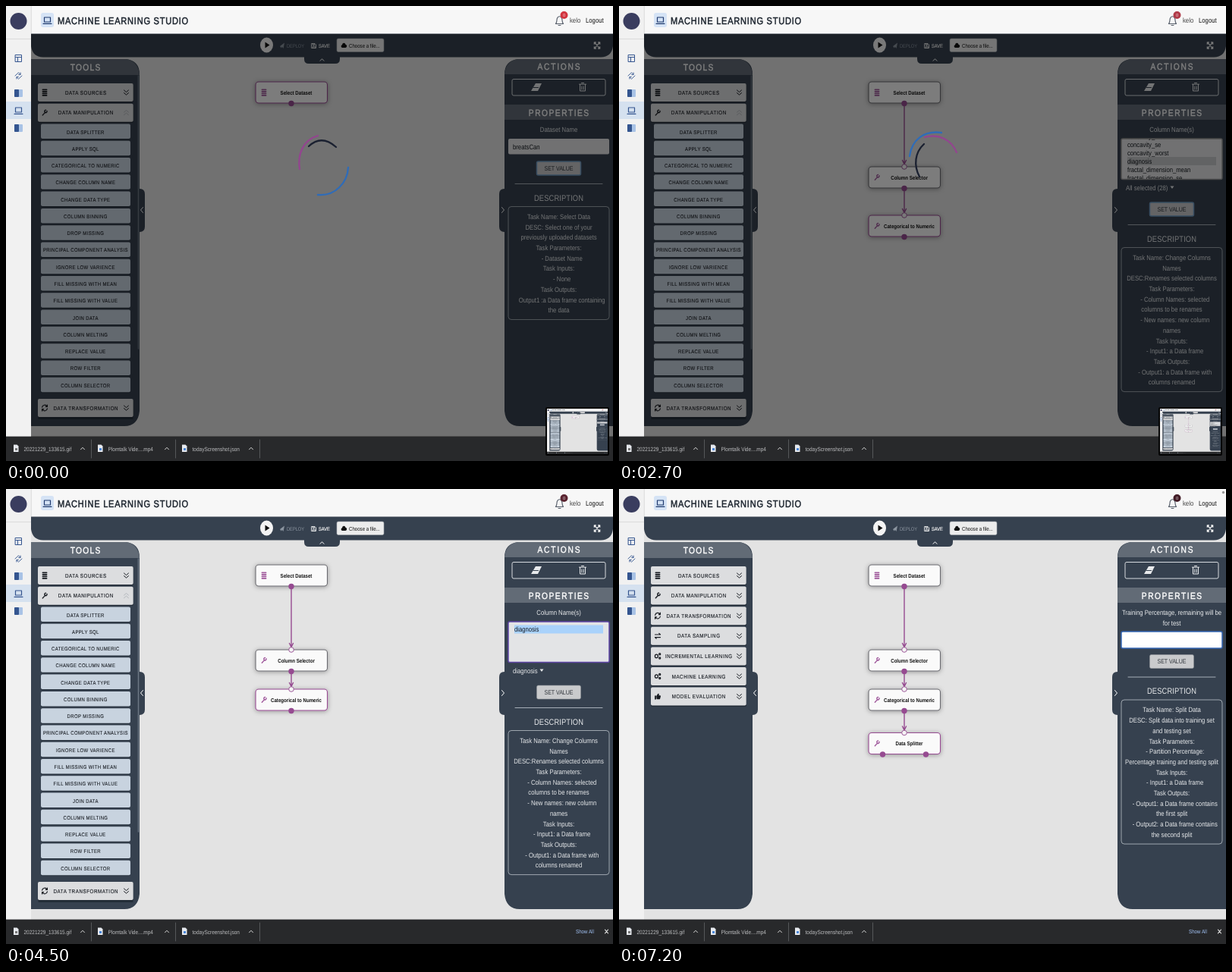
Animation, 800 px wide and 600 px high, one loop 8000 ms. Source, as an HTML page:

```html
<!DOCTYPE html>
<html lang="en">
<head>
<meta charset="utf-8">
<title>Machine Learning Studio</title>
<style>
  html, body { margin: 0; width: 100%; height: 100%; overflow: hidden; background: #e3e3e3; }
  svg { display: block; width: 800px; height: 600px; }
  text { font-family: "Liberation Sans", Arial, sans-serif; white-space: pre; text-rendering: geometricPrecision; }
</style>
</head>
<body>
<svg id="stage" viewBox="0 0 800 600"></svg>
<script>
const STEP = 900, LOOP = 8000;
const ASPECT = 0.85; // the whole screen is squeezed horizontally
const NAVY = '#36414f', STRIP = '#626b76', PURPLE = '#964b91', INK = '#161a20', PALE = '#e8eaec';

// ---- drawing helpers ----
const rect = (x, y, w, h, fill, r = 0, extra = '') =>
  `<rect x="${x}" y="${y}" width="${w}" height="${h}" rx="${r}" fill="${fill}" ${extra}/>`;
const outline = (color, width = 1) => `stroke="${color}" stroke-width="${width}"`;
const fillPath = (d, fill) => `<path d="${d}" fill="${fill}"/>`;
const line = (d, color, width = 1) =>
  `<path d="${d}" fill="none" stroke="${color}" stroke-width="${width}" stroke-linecap="round" stroke-linejoin="round"/>`;
const dot = (x, y, r, fill, extra = '') => `<circle cx="${x}" cy="${y}" r="${r}" fill="${fill}" ${extra}/>`;
const at = (x, y, content) => `<g transform="translate(${x} ${y})">${content}</g>`;

// y is the vertical middle of the capitals; centred text makes up for the gap after its last letter
function text(x, y, label, size, fill, { anchor = 'middle', gap = 0, weight = 400, heavy = 0 } = {}) {
  const left = anchor === 'middle' ? x + gap * ASPECT / 2 : x;
  return `<text transform="translate(${left} ${y + size * 0.36}) scale(${ASPECT} 1)" font-size="${size}" fill="${fill}"
    text-anchor="${anchor}" letter-spacing="${gap}" font-weight="${weight}" stroke="${fill}" stroke-width="${heavy}">${label}</text>`;
}
const left = (x, y, label, size, fill) => text(x, y, label, size, fill, { anchor: 'start' });

const ICONS = {
  db: ['M-2.6-3.7h5.2M-2.6-1.2h5.2M-2.6 1.3h5.2M-2.6 3.8h5.2', 1.7],
  wrench: ['M-2.7 3.2L.8-.6M3-2.2A1.6 1.8 0 1 1 1.5-3.6', 1.4],
  refresh: ['M-3.4-.8A3.5 3.8 0 0 1 3-2M3.4-4v2.4h-2M3.4.8A3.5 3.8 0 0 1-3 2M-3.4 4v-2.4h2', 1.2],
  swap: ['M-3.5-1.8h7l-1.7-1.6M3.5 1.8h-7l1.7 1.6', 1.2],
  gears: ['M-3.6 0a2 2.2 0 1 0 4 0a2 2.2 0 1 0-4 0M1.7-2.6a1 1.1 0 1 0 2 0a1 1.1 0 1 0-2 0M1.7 2.6a1 1.1 0 1 0 2 0a1 1.1 0 1 0-2 0', 1.3],
  thumb: ['M-3-.4v3.6M-.6 2.8h2.8l.9-3.2h-2.6l.3-2.6l-1.7 2.8zM.5 1.200h1.500', 1.8],
  laptop: ['M-4-4h8v6h-8zM-5.5 4.3h11', 1.2],
  layout: ['M-4-4.5h8v9h-8zM-4-1.5h8M-1-1.5v6', 1],
  sync: ['M-4.5 0L0-4.2L2.2-2M.2-1.4h2.4v-2.6M4.5 0L0 4.2L-2.2 2M-.2 1.4h-2.4v2.6', 0.9],
  bell: ['M-5 4.5c2-2 1-5 2-7.5c1-3 5-3 6 0c1 2.5 0 5.5 2 7.5zM-1.5 6.5h3', 1.1],
  trash: ['M-4.5-3.8h9M-1.5-5.5h3M-3.5-3.5v8.5h7v-8.5M-1.2-1v4M1.2-1v4', 1],
  expand: ['M-3.5-4L3.5 4M3.5-4L-3.5 4M-3.7-1.8v-2.4h2.2M3.7-1.8v-2.4h-2.2M-3.7 1.8v2.4h2.2M3.7 1.8v2.4h-2.2', 1.2],
  up: ['M-2.5 1.3l2.5-2.6l2.5 2.6', 1],
  twoDown: ['M-3-3l3 2.6l3-2.6M-3 .6l3 2.6l3-2.6', 1],
  twoUp: ['M-3 3l3-2.6l3 2.6M-3-.6l3-2.6l3 2.6', 1],
};
const icon = (name, x, y, color) => at(x, y, line(ICONS[name][0], color, ICONS[name][1]));

// ---- content ----
const CATEGORIES = [
  ['db', 'DATA SOURCES'], ['wrench', 'DATA MANIPULATION'], ['refresh', 'DATA TRANSFORMATION'],
  ['swap', 'DATA SAMPLING'], ['gears', 'INCREMENTAL LEARNING'], ['gears', 'MACHINE LEARNING'], ['thumb', 'MODEL EVALUATION'],
];
const TOOLS = ['DATA SPLITTER', 'APPLY SQL', 'CATEGORICAL TO NUMERIC', 'CHANGE COLUMN NAME', 'CHANGE DATA TYPE',
  'COLUMN BINNING', 'DROP MISSING', 'PRINCIPAL COMPONENT ANALYSIS', 'IGNORE LOW VARIENCE', 'FILL MISSING WITH MEAN',
  'FILL MISSING WITH VALUE', 'JOIN DATA', 'COLUMN MELTING', 'REPLACE VALUE', 'ROW FILTER', 'COLUMN SELECTOR'];
const COLUMNS = ['concavity_mean', 'concavity_se', 'concavity_worst', 'diagnosis', 'fractal_dimension_mean', 'fractal_dimension_se'];

const PANELS = {
  dataset: { title: ['Dataset Name'], button: 214, help: ['Task Name: Select Data', 'DESC: Select one of your',
    'previously uploaded datasets', 'Task Parameters:', '- Dataset Name', 'Task Inputs:', '- None', 'Task Outputs:',
    'Output1 :a Data frame containing', 'the data'] },
  columns: { title: ['Column Name(s)'], button: 268, help: ['Task Name: Change Columns', 'Names',
    'DESC:Renames selected columns', 'Task Parameters:', '- Column Names: selected', 'columns to be renames',
    '- New names: new column', 'names', 'Task Inputs:', '- Input1: a Data frame', 'Task Outputs:',
    '- Output1: a Data frame with', 'columns renamed'] },
  split: { title: ['Training Percentage, remaining will be', 'for test'], button: 227.5, help: ['Task Name: Split Data',
    'DESC: Split data into training set', 'and testing set', 'Task Parameters:', '- Partition Percentage:',
    'Percentage training and testing split', 'Task Inputs:', '- Input1: a Data frame', 'Task Outputs:',
    '- Output1: a Data frame contains', 'the first split', '- Output2: a Data frame contains', 'the second split'] },
};

const NODES = ['Select Dataset', 'Column Selector', 'Categorical to Numeric', 'Data Splitter'];
const WIDE = [114, 226, 290], TIGHT = [114, 226, 278], FULL = [...TIGHT, 335.5];

// spinner: purple, dark and blue arc
const SPIN_A = ['M387 215C384 196 391 177 411 171', 'M399 185Q416 169 435 186', 'M451 213C450 233 434 251 411 249'];
const SPIN_B = ['M403 173C421 168 438 176 445 193', 'M402 182C390 193 388 210 396 225', 'M383 198C386 176 402 164 425 167'];

const SCENES = [
  { nodes: [114], picked: 0, panel: 'dataset', open: true, badge: '#d2343f', spin: SPIN_A },
  { nodes: [114], picked: 0, panel: 'dataset', open: true, badge: '#a33642', popup: true },
  { nodes: WIDE.slice(0, 2), picked: 1, panel: 'columns', open: true, badge: '#a33642' },
  { nodes: WIDE, picked: 2, panel: 'columns', open: true, badge: '#b03a48', spin: SPIN_B },
  { nodes: WIDE, picked: 2, panel: 'columns', open: true, badge: '#4a2029', status: true },
  { nodes: TIGHT, picked: 2, panel: 'columns', open: true, badge: '#5a2430', only: true },
  { nodes: TIGHT, picked: 2, panel: 'columns', badge: '#6b2836', only: true },
  { nodes: FULL, picked: 3, panel: 'split', open: true, badge: '#55222d' },
  { nodes: FULL, picked: 3, panel: 'split', badge: '#421c26', corner: true },
];

// ---- screen parts ----
function header(s) {
  const blue = '#34558f', sky = '#a9c3e6';
  const book = y => rect(11, y - 5, 11, 10, sky, 1) + rect(11, y - 5, 6, 10, blue, 1);
  return rect(0, 0, 800, 37, '#f7f7f7') + rect(0, 0, 33, 568, '#f1f1f1') + rect(0, 126, 33, 23, '#d5e1ef') +
    line('M0 43.5H33M33.3 0V36', '#dadada') + dot(16.5, 20, 11, '#3a3d5f') +
    icon('layout', 16.5, 69, blue) + icon('sync', 16.5, 92, blue) + book(115) + icon('laptop', 16.5, 138, blue) + book(161) +
    rect(46, 9, 17, 19, '#d5e3f5', 3) + icon('laptop', 54.5, 19, '#1f3a6e') +
    text(68, 19, 'MACHINE LEARNING STUDIO', 13, '#1c242e', { anchor: 'start', gap: 0.9, heavy: 0.5 }) +
    icon('bell', 729.5, 19, '#525a66') + dot(735.5, 12, 5, s.badge) + text(735.5, 12, '0', 5.5, '#fff') +
    left(743, 19, 'kelo', 9.1, '#444') + left(764, 19, 'Logout', 9.1, '#111') +
    (s.corner ? dot(796.5, 4.5, 1.7, '#999') : '');
}

function toolbar() {
  return fillPath('M33 36.6H800V53Q798 67.4 784 67.4H440V70Q440 76 434 76H399Q393 76 393 70V67.4H49Q35 67.4 33 53z', NAVY) +
    '<ellipse cx="343.5" cy="51.5" rx="8.5" ry="10" fill="#f4f4f4"/>' + fillPath('M341.5 47.5L347.5 51.5L341.5 55.5z', '#111') +
    fillPath('M361 53L367 48.5L365.5 56L363.8 53.8L362.8 55.5z', '#8c95a0') + left(370, 52.5, 'DEPLOY', 6.7, '#8c95a0') +
    line('M403 49.5h4l1.5 1.5v4.5h-5.5zM404.5 49.5v2h2v-2M404.5 55v-1.8h2.5v1.8', '#f2f2f2', 0.9) +
    text(412, 52.5, 'SAVE', 6.7, '#f2f2f2', { anchor: 'start', heavy: 0.2 }) +
    rect(436, 43, 62, 17.5, '#ececec', 2, outline('#a4a9af', 0.6)) +
    fillPath('M443 55a2 2 0 0 1 0-3.8a2.3 2.7 0 0 1 4.5-.5a2.2 2.2 0 0 1 0 4.3z', '#111') +
    left(452, 52, 'Choose a file...', 7.2, '#111') + icon('expand', 779, 52, '#f4f4f4') + icon('up', 416.5, 71, '#fff');
}

function category([glyph, label], y, opened) {
  return rect(42, y - 11.2, 126, 24.5, '#222b36', 2) + rect(42, y - 12, 125.7, 24, '#dcdddf', 2) + icon(glyph, 51, y, INK) +
    text(105, y, label, 7.3, INK, { gap: 0.68, heavy: 0.15 }) + icon(opened ? 'twoUp' : 'twoDown', 158.5, y, opened ? '#b4b8bd' : INK);
}

function tool(name, i) {
  const y = 165.5 + i * 22.28;
  return rect(46, y - 9.5, 118, 20, '#28323e', 2) + rect(46, y - 10, 118, 19.5, '#c8d3df', 2) +
    text(104.7, y + 0.5, name, 7, INK, { gap: 0.46, heavy: 0.1 });
}

const heading = (x, y, label, gap) => text(x, y, label, 12, '#fff', { gap, heavy: 0.45 });

function toolsPanel(s) {
  const list = s.open
    ? CATEGORIES.slice(0, 3).map((c, i) => category(c, [114, 140.7, 530][i], i === 1)).join('') +
      TOOLS.map(tool).join('') + line('M43 544H167', '#1f2833', 1.5) + line('M174.5 92V452', '#6c7784', 1.5)
    : CATEGORIES.map((c, i) => category(c, 114 + i * 26.6)).join('');
  return fillPath('M33 70H158Q176 72 176 90V241Q183 241 183 248V291Q183 298 176 298V534Q174 554 156 554H33z', NAVY) +
    fillPath('M33 70H158Q174 72 176 91H33z', STRIP) + heading(104.5, 80.5, 'TOOLS', 1.5) +
    list + line('M180.5 265.5L177.5 269L180.5 272.5', '#fff');
}

function columnList(s) {
  const rows = s.only ? ['diagnosis'] : COLUMNS, first = s.only ? 185 : 171.5, mark = s.only ? 185 : 204.5;
  const focus = s.spin || s.nodes.length < 3 ? '#999' : '#5f46a6';
  const label = s.only ? 'diagnosis' : 'All selected (28)', tip = s.only ? 706 : 729;
  return rect(662, 175, 133, 53.5, '#e3e4e6', 2, outline(focus, 1.5)) +
    rect(670, mark - 5.5, 117, 11, s.spin ? '#c6c8ca' : '#a9d2fb') +
    `<g clip-path="url(#list)">${rows.map((name, i) => left(670, first + i * 11, name, 9, '#14181d')).join('')}</g>` +
    left(668, 239.5, label, 9.1, PALE) + fillPath(`M${tip - 2.5} 237.5h5l-2.5 3.5z`, PALE);
}

function field(s) {
  if (s.panel === 'columns') return columnList(s);
  if (s.panel === 'split') return rect(662, 188, 133, 22, '#fff', 2, outline(s.corner ? '#3567b5' : '#aaa', 1.5));
  if (!s.popup) return rect(662, 175, 133, 20.5, '#e3e4e6', 2) + left(668, 185.5, 'breatsCan', 9.1, INK);
  return rect(662, 175.5, 133, 20, '#e3e4e6', 2, outline(PURPLE, 1.5)) + rect(658, 176.5, 134, 20, '#3f4348', 2.5) +
    rect(660, 179, 129.5, 14.5, '#4590e8', 2) + line('M663.5 186.5l1.3 2l2.5-5', '#fff') + left(670, 186.2, 'breatsCan', 9.1, '#fff');
}

function propertiesPanel(s) {
  const { title, button: y, help } = PANELS[s.panel];
  return fillPath('M800 70H675Q657 72 657 90V241Q650 241 650 248V291Q650 298 657 298V534Q659 554 677 554H800z', NAVY) +
    fillPath('M800 70H675Q659 72 657 90H800z', STRIP) + heading(728.5, 80, 'ACTIONS', 2.1) +
    rect(667, 96.5, 123, 21.5, 'none', 2, outline('#d6dade')) +
    fillPath('M698 102h8l-5 10h-9z', PALE) + line('M695 107.5h6.5', NAVY) + icon('trash', 760, 107, PALE) +
    rect(657, 130, 143, 20, STRIP) + heading(728.5, 140.5, 'PROPERTIES', 1.8) +
    title.map((t, i) => text(728.5, 163 + i * 13.7, t, 9.1, PALE)).join('') + field(s) +
    rect(699.5, y - 9, 58, 18, '#c9cacc', 2, s.spin ? outline('#6f9cc4', 1.5) : outline('#8d9298', 0.6)) +
    text(728.5, y, 'SET VALUE', 8.3, '#30353b') +
    line(`M671 ${y + 20.5}H786`, '#a7afb8') + text(728.5, y + 39, 'DESCRIPTION', 11, PALE, { gap: 0.13 }) +
    rect(662, y + 50.5, 133, help.length * 13.7 + 12, 'none', 4, outline('#b9c0c7', 0.8)) +
    help.map((t, i) => text(/^(-|Output)/.test(t) ? 732.7 : 728.5, y + 63.7 + i * 13.7, t, 9.1, PALE)).join('') +
    line('M653.5 265.5L656.5 269L653.5 272.5', '#fff');
}

function flow(s) {
  return s.nodes.map((y, i) => {
    const outs = i === 3 ? [347.5, 404.5] : [376];
    const input = i ? line(`M376 ${s.nodes[i - 1] + 14}V${y - 18}M373.5 ${y - 22.5}L376 ${y - 17.5}L378.5 ${y - 22.5}`, PURPLE, 1.4) : '';
    return input + rect(329, y - 14, 94.5, 28, '#fafafa', 4, outline(s.picked === i ? PURPLE : '#6b6b70', 1.1) + ' filter="url(#shadow)"') +
      (i ? dot(376, y - 14, 3.3, '#f4f4f4', outline(PURPLE, 0.9)) : '') +
      outs.map(x => dot(x, y + 14.5, 3.7, PURPLE)).join('') +
      icon(i ? 'wrench' : 'db', 340, y, '#a05a9c') + text(382.5, y + 0.3, NODES[i], 7.2, '#111', { weight: 700 });
  }).join('');
}

function downloads(s) {
  const files = ['20221229_133615.gif', 'Plomtalk Vide....mp4', 'todayScreenshot.json'];
  return rect(0, 567.6, 800, 32.4, '#28292b') + files.map((name, i) => at(i * 111, 0,
    fillPath('M10 578.5h4.5l2 2v7.5h-6.5z', '#e6e9ee') + rect(12, 583, 3, 3, i ? '#4a86d8' : '#777') +
    left(23.5, 584, name, 7.65, '#bcbdbf') + icon('up', 101, 583.5, '#d5d5d5') +
    line('M112.5 572V596', '#55575a'))).join('') +
    left(751, 583.5, 'Show All', 7.3, '#a3c4f7') + line('M789.5 581.2l4 4.6M793.5 581.2l-4 4.6', '#ddd', 1.1) +
    (s.status ? rect(-3, 556, 61, 12.5, '#0d0d0e', 2) + left(2, 562, 'localhost:8080/ml#', 7.5, '#f2f2f2') : '');
}

function busy(arcs) {
  return rect(33, 37, 767, 531, '#000', 0, 'opacity=".5"') +
    arcs.map((d, i) => line(d, ['#93458f', '#1a2030', '#2f6cb8'][i], 2.3)).join('') +
    rect(711, 529, 84, 64, '#050505', 2) + '<use href="#app" transform="translate(713 531) scale(.1)"/>';
}

const scene = s => `<defs>
    <clipPath id="list"><rect x="663" y="175" width="131" height="53"/></clipPath>
    <filter id="shadow" x="-20%" y="-40%" width="140%" height="180%">
      <feDropShadow dx="0" dy="1" stdDeviation="3" flood-opacity=".35"/></filter>
  </defs>
  <g id="app">${rect(0, 0, 800, 600, '#e3e3e3') + header(s) + toolbar() + toolsPanel(s) + propertiesPanel(s) + flow(s) + downloads(s)}</g>
  ${s.spin ? busy(s.spin) : ''}`;

const stage = document.getElementById('stage');
let shown = -1;
function tick() {
  const index = Math.floor(performance.now() % LOOP / STEP);
  if (index !== shown) stage.innerHTML = scene(SCENES[shown = index]);
  requestAnimationFrame(tick);
}
tick();
</script>
</body>
</html>
```
